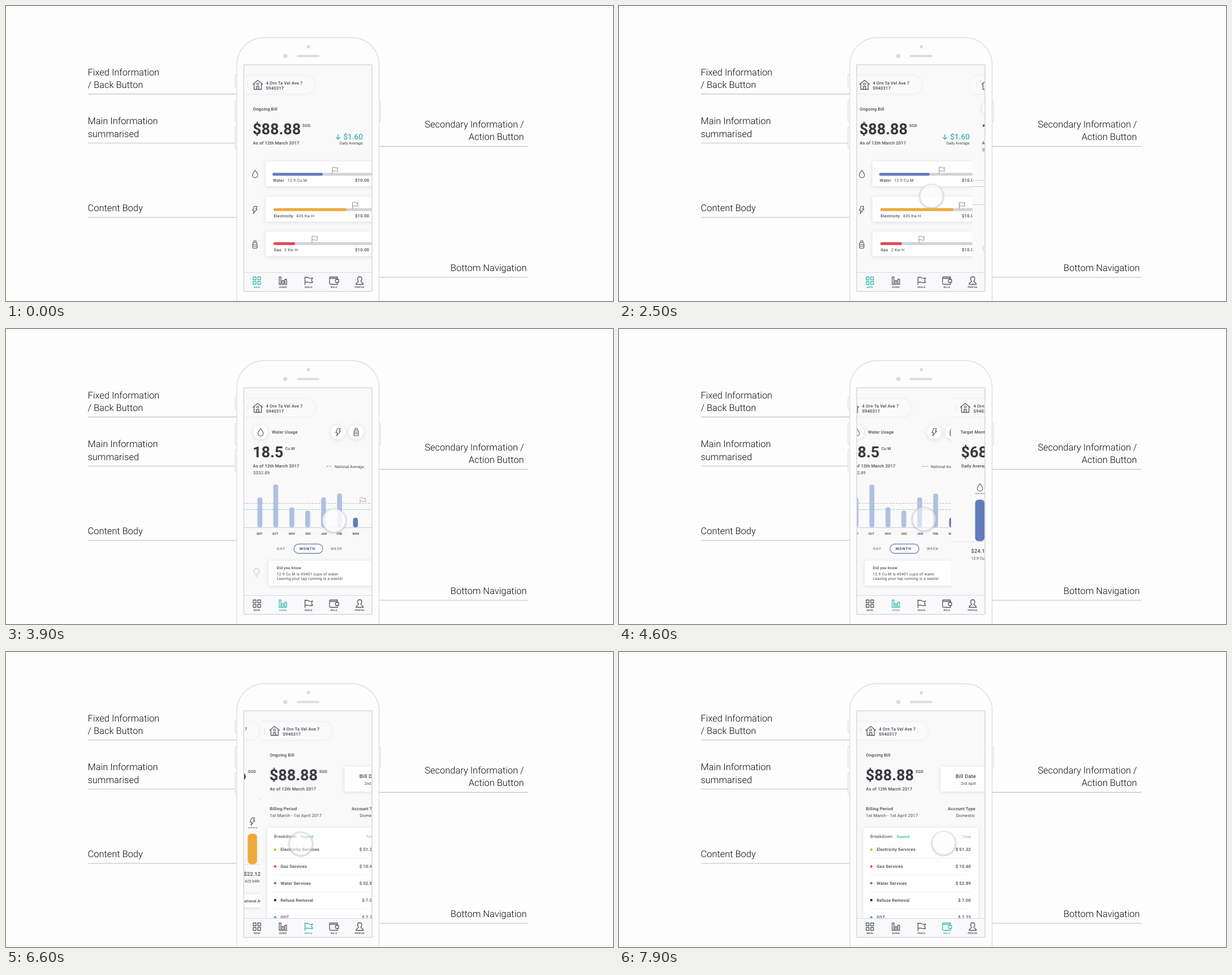
These frames come from a looping animation (1073 by 522 pixels, 8 s). An HTML page:

```html
<!DOCTYPE html>
<html lang="en">
<head>
<meta charset="utf-8">
<title>Utility app layout</title>
<style>
html, body { margin: 0; width: 100%; height: 100%; overflow: hidden; background: #fdfdfd; }
svg { display: block; width: 1073px; height: 522px; }
text { font-family: Roboto, sans-serif; fill: #45454c; text-rendering: geometricPrecision; }
.note text { font-size: 16.45px; font-weight: 300; fill: #0c0c0c; }
.rules path { fill: none; stroke-width: 1.2; }
.body { fill: none; stroke: #dedede; stroke-width: 1.4; }

.s { font-size: 6.8px; }
.l { font-size: 7.1px; letter-spacing: .25px; }
.tip-text { font-size: 6.8px; letter-spacing: .25px; }
.m { font-size: 7.6px; font-weight: 500; letter-spacing: .2px; }
.r { font-size: 7.6px; letter-spacing: .2px; }
.big { font-size: 27px; font-weight: 700; fill: #37373d; }
.unit { font-size: 7px; font-weight: 500; letter-spacing: .2px; }
.sum { font-size: 13.6px; font-weight: 500; fill: #3bb6aa; }
.price { font-size: 9.2px; font-weight: 500; letter-spacing: .2px; }
.month { font-size: 5.2px; font-weight: 700; letter-spacing: .2px; }
.range { font-size: 6.4px; font-weight: 700; letter-spacing: 1px; fill: #8b8b92; }
.b { font-weight: 500; }
.end { text-anchor: end; }
.mid { text-anchor: middle; }
.teal { fill: #3bb6aa; }

.icon { fill: none; stroke: #55555e; stroke-width: 1.1; stroke-linejoin: round; stroke-linecap: round; }
.card { fill: #fefefe; filter: drop-shadow(0 1px 3px rgba(70, 70, 95, .16)); }
.paper { fill: #f9f9fa; }
.track { fill: #d3d3d7; }
.blue { fill: #627cbc; }
.pale { fill: #b1bfe4; }
.gold { fill: #efaa3b; }
.red { fill: #e04a5c; }
.line { fill: none; stroke: #e0e0e8; }
.dash { fill: none; stroke: #55555e; stroke-width: 1.2; stroke-dasharray: 3.2 1.2; }

.page, .tab, .touch, .tip { animation: 8s infinite; }
.page { animation-timing-function: cubic-bezier(.4, 0, .2, 1); clip-path: url(#screen); }
.main { animation-name: main; }
.usage { animation-name: usage; }
.goals { animation-name: goals; }
.bills { animation-name: bills; }
@keyframes main {
  0%, 29.5% { transform: none; }
  39.5%, 100% { transform: translateX(-113px); }
}
@keyframes usage {
  0%, 29.5% { transform: translateX(227px); }
  39.5%, 54.9% { transform: translateX(0); }
  64.9%, 100% { transform: translateX(-113px); }
}
@keyframes goals {
  0%, 54.9% { transform: translateX(227px); }
  64.9%, 76.6% { transform: translateX(0); }
  86.6%, 100% { transform: translateX(-113px); }
}
@keyframes bills {
  0%, 76.6% { transform: translateX(227px); }
  86.6%, 100% { transform: translateX(0); }
}

.tab { color: #55555e; animation-timing-function: linear; }
.tab .icon { stroke: currentColor; stroke-width: 1.3; }
.tab text { fill: currentColor; font-size: 4.3px; font-weight: 700; text-anchor: middle; }
.t1 { animation-name: tab1; }
.t2 { animation-name: tab2; }
.t3 { animation-name: tab3; }
.t4 { animation-name: tab4; }
@keyframes tab1 {
  0%, 34.5% { color: #36bcae; }
  43.25%, 100% { color: #55555e; }
}
@keyframes tab2 {
  0%, 34.5%, 68.5%, 100% { color: #55555e; }
  43.25%, 59.9% { color: #36bcae; }
}
@keyframes tab3 {
  0%, 59.9%, 90.25%, 100% { color: #55555e; }
  68.5%, 81.5% { color: #36bcae; }
}
@keyframes tab4 {
  0%, 81.5% { color: #55555e; }
  90.25%, 100% { color: #36bcae; }
}

.touch { animation-name: touch; animation-timing-function: linear; }
@keyframes touch {
  0%, 18.75% { transform: translate(676px, 322px); }
  20% { transform: translate(664px, 323px); }
  25% { transform: translate(592px, 332px); }
  29.5% { transform: translate(570px, 336px); }
  32.6% { transform: translate(539px, 336px); }
  35.2% { transform: translate(518px, 337px); }
  38.75% { transform: translate(566px, 336px); }
  42.5% { transform: translate(588px, 340px); }
  51.25% { transform: translate(577px, 338px); }
  54.375% { transform: translate(568px, 337px); }
  57.5% { transform: translate(539px, 336px); }
  60% { transform: translate(518px, 337px); }
  63.75% { transform: translate(566px, 336px); }
  67% { transform: translate(588px, 340px); }
  70% { transform: translate(586px, 340px); }
  76.5% { transform: translate(570px, 338px); }
  79.6% { transform: translate(539px, 338px); }
  82.5% { transform: translate(521px, 339px); }
  86.25% { transform: translate(566px, 338px); }
  90% { transform: translate(588px, 340px); }
  98.75% { transform: translate(574px, 338px); }
  100% { transform: translate(571px, 338px); }
}
.tip { fill: #fdfdfe; stroke: #d8d8de; stroke-width: .6; animation-name: tip; animation-timing-function: linear; }
@keyframes tip {
  0%, 29.5%, 51.25%, 54.375%, 75%, 76.5%, 98%, 100% { fill-opacity: .95; }
  32.6%, 42.5%, 57.5%, 70%, 79.6%, 90% { fill-opacity: .5; }
}
</style>
</head>
<body>
<svg viewBox="0 0 1073 522">
<defs>
  <clipPath id="screen"><rect x="420.5" y="104.5" width="226" height="400"/></clipPath>
  <filter id="soft" x="-50%" y="-50%" width="200%" height="200%"><feGaussianBlur stdDeviation="1.2"/></filter>
  <path id="drop" d="M0-6.5C2-3.3 4.7-.3 4.7 2.3A4.7 4.5 0 0 1-4.7 2.3C-4.7-.3-2-3.3 0-6.5Z"/>
  <path id="bolt" d="M-1-6.5H4L2-1.8H4.5L-2.5 6.5-1 1H-4Z"/>
  <path id="tank" d="M-2-6.5H2V-3.5H-2ZM-2-3.5Q-4-3-4-1V4.5Q-4 6.5-2 6.5H2Q4 6.5 4 4.5V-1Q4-3 2-3.5M-4 0H4M-4 3H4"/>
  <path id="flag" d="M0 11V0Q2.5-1 5 .5T10 .5L8.5 3.5 10 6.5Q7.5 7.5 5 6.5T0 6.5"/>
  <g id="chip">
    <path class="card" style="filter:drop-shadow(0 0 2px rgba(70,70,95,.1));fill:#fafafb" d="M416 124H530.5A15.5 15.5 0 0 1 530.5 155H416Z"/>
    <path d="M427.5 135.5V144" stroke="#b8b8bf" stroke-width="1" stroke-dasharray="1.2 2"/>
    <path class="icon" style="stroke-width:1.3" d="M436.5 138.5 445 131.5 453.5 138.5M438.5 137.5V147.5H451.5V137.5M443 147.5V142.5H447V147.5"/>
    <circle class="icon" cx="445" cy="138" r="1.8"/>
    <text class="m" x="459.5" y="138.5">4 Orn Ta Vel Ave 7</text>
    <text class="m" x="459.5" y="147.5">S940317</text>
  </g>
  <g id="bill">
    <text class="m" x="436.5" y="185">Ongoing Bill</text>
    <text class="big" x="436" y="227">$88.88</text>
    <text class="unit" x="524" y="214">SGD</text>
    <text class="m" x="436.5" y="245">As of 12th March 2017</text>
  </g>
  <rect id="sheet" class="paper" x="420" y="104" width="227" height="368"/>
</defs>

<rect width="1073" height="522" fill="#fdfdfd"/>

<g class="note">
  <text x="144.5" y="122.5">Fixed Information</text>
  <text x="144.5" y="144.5">/ Back Button</text>
  <text x="144.5" y="208.5">Main Information</text>
  <text x="144.5" y="231.5">summarised</text>
  <text x="144.5" y="362.5">Content Body</text>
  <text class="end" x="915.5" y="214.5">Secondary Information /</text>
  <text class="end" x="915.5" y="236.5">Action Button</text>
  <text class="end" x="920.5" y="468.5">Bottom Navigation</text>
</g>
<g class="rules">
  <path stroke="#c3bdd8" d="M145 155.7H408"/>
  <path stroke="#c2bfc6" d="M145 242.5H405"/>
  <path stroke="#bcbbae" d="M145 374H408"/>
  <path stroke="#bfc3bb" d="M660 248.3H923"/>
  <path stroke="#bcc4a4" d="M660 480H923"/>
</g>

<g class="body">
  <path d="M408 523V104A48 48 0 0 1 456 56H611.5A48 48 0 0 1 659.5 104V523"/>
  <path d="M408 121H406Q405 121 405 123V141Q405 143 406 143H408M408 167H406Q405 167 405 169V203Q405 205 406 205H408M408 214H406Q405 214 405 216V250Q405 252 406 252H408M659.5 167H661Q662 167 662 169V203Q662 205 661 205H659.5"/>
</g>
<g fill="#dcdcdc">
  <circle cx="534.5" cy="72" r="3"/>
  <circle cx="493.7" cy="88.5" r="3.8"/>
  <rect x="514" y="86.5" width="40" height="4" rx="2"/>
</g>

<g clip-path="url(#screen)">
  <g class="page main">
    <use href="#sheet"/>
    <use href="#chip"/>
    <use href="#bill"/>
    <path d="M587 227V235.5M583.2 232 587 235.7 590.8 232" fill="none" stroke="#3bb6aa" stroke-width="1.4"/>
    <text class="sum end" x="631" y="236">$1.60</text>
    <text class="s end" x="630.5" y="245">Daily Average</text>

    <rect class="card" x="459" y="275" width="200" height="44" rx="2"/>
    <rect class="track" x="471" y="295.3" width="190" height="5" rx="2.5"/>
    <rect class="blue" x="471" y="295.3" width="89" height="5" rx="2.5"/>
    <text class="l b" x="472" y="310.5">Water</text>
    <text class="l" x="497.5" y="310.5">12.9 Cu M</text>
    <text class="m end" x="642" y="310.5">$10.00</text>

    <rect class="card" x="459" y="337.5" width="200" height="44" rx="2"/>
    <rect class="track" x="473" y="357.8" width="190" height="5" rx="2.5"/>
    <rect class="gold" x="473" y="357.8" width="129" height="5" rx="2.5"/>
    <text class="l b" x="473.5" y="373.5">Electricity</text>
    <text class="l" x="513" y="373.5">435 Kw H</text>
    <text class="m end" x="642" y="373.5">$10.00</text>

    <rect class="card" x="459" y="399" width="200" height="44" rx="2"/>
    <rect class="track" x="473" y="418" width="190" height="5" rx="2.5"/>
    <rect class="red" x="473" y="418" width="38" height="5" rx="2.5"/>
    <text class="l b" x="473.5" y="434">Gas</text>
    <text class="l" x="492" y="434">2 Kw H</text>
    <text class="m end" x="642" y="434">$10.00</text>

    <g class="icon">
      <use href="#drop" x="440.3" y="297"/>
      <use href="#bolt" x="439.7" y="361"/>
      <use href="#tank" x="440" y="422"/>
      <g stroke="#85858c" stroke-width=".9">
        <use href="#flag" x="577" y="285.5"/>
        <use href="#flag" x="612.5" y="347.5"/>
        <use href="#flag" x="541" y="407.5"/>
      </g>
    </g>
  </g>

  <g class="page usage">
    <use href="#sheet"/>
    <use href="#chip"/>
    <circle class="card" cx="450" cy="182.5" r="13"/>
    <circle class="card" cx="587" cy="182.5" r="13"/>
    <circle class="card" cx="619" cy="182.5" r="13"/>
    <g class="icon">
      <use href="#drop" x="450" y="182.5"/>
      <use href="#bolt" x="587" y="182.5"/>
      <use href="#tank" x="619" y="182.5"/>
    </g>
    <text class="m" x="470" y="185">Water Usage</text>
    <text class="big" x="436" y="227">18.5</text>
    <text class="unit" x="493.5" y="214">Cu M</text>
    <text class="m" x="436.5" y="245">As of 12th March 2017</text>
    <path class="dash" d="M566 243H576" style="stroke:#3bb6aa;stroke-dasharray:4 1.5"/>
    <text class="s end" x="632.5" y="245.5">National Average</text>
    <text class="r" x="437" y="257">S$52.89</text>

    <path d="M420 351.5H647" stroke="#c5cbe6"/>
    <g class="pale">
      <rect x="444.5" y="298" width="8.6" height="53" rx="4"/>
      <rect x="472.5" y="275" width="8.6" height="76" rx="4"/>
      <rect x="501" y="315.5" width="8.6" height="35.5" rx="4"/>
      <rect x="529" y="321.5" width="8.6" height="29.5" rx="4"/>
      <rect x="557" y="298" width="8.6" height="53" rx="4"/>
      <rect x="585.3" y="291" width="8.6" height="60" rx="4"/>
      <rect class="blue" x="613.5" y="334" width="8.6" height="17" rx="4"/>
    </g>
    <path d="M420 308.5H647" stroke="#b9c3b8" stroke-dasharray="3.5 2"/>
    <path d="M420 319.5H647" stroke="#84cfcb" stroke-dasharray="3.5 2"/>
    <g class="icon" style="stroke:#b9b9bf"><use href="#flag" x="626" y="298.5"/></g>
    <g class="mid">
      <text class="month" x="448" y="364">SEP</text>
      <text class="month" x="476" y="364">OCT</text>
      <text class="month" x="505.5" y="364">NOV</text>
      <text class="month" x="534.3" y="364">DEC</text>
      <text class="month" x="562" y="364">JAN</text>
      <text class="month" x="589.3" y="364">FEB</text>
      <text class="month" x="618.5" y="364">MAR</text>
    </g>
    <rect x="509" y="380.5" width="51" height="16.5" rx="8.2" fill="#fdfdfe" stroke="#7388c4" stroke-width="1.4"/>
    <text class="range" x="479" y="391">DAY</text>
    <text class="range" x="519" y="391" style="fill:#45454c">MONTH</text>
    <text class="range" x="574" y="391">WEEK</text>

    <rect class="card" x="464" y="410" width="195" height="44" rx="2"/>
    <path class="icon" style="stroke:#c6c6cc" d="M441 434Q438.3 431 438.3 428.7A4.8 4.8 0 0 1 447.9 428.7Q447.9 431 445.2 434ZM441 436.5H445.2M442 439H444.2"/>
    <text class="tip-text b" x="478.5" y="425">Did you know</text>
    <text class="tip-text" x="478.5" y="435.5">12.9 Cu M is 45401 cups of water</text>
    <text class="tip-text" x="478.5" y="443.5">Leaving your tap running is a waste!</text>
  </g>

  <g class="page goals">
    <use href="#sheet"/>
    <use href="#chip"/>
    <text class="m" x="436.5" y="185">Target Monthly Bill</text>
    <text class="big" x="437.5" y="227">$68.66</text>
    <text class="unit" x="526" y="214">SGD</text>
    <text class="m" x="438" y="245">Daily Average S$2.21</text>
    <text class="sum end" x="632.5" y="235.5">$20.00</text>
    <text class="s end" x="632.5" y="245.5">Potential Savings</text>
    <path class="dash" d="M547.5 261H557"/>
    <text class="s end" x="632.5" y="263">Current Average Usage</text>

    <path class="line" d="M420 376.5H647"/>
    <rect class="blue" x="462.5" y="302" width="16.5" height="73.5" rx="6"/>
    <rect class="gold" x="525.5" y="321.5" width="16.5" height="54" rx="6"/>
    <rect class="red" x="587.5" y="366.5" width="16.5" height="9" rx="4.5"/>
    <path class="dash" d="M463 291H479.5M526 311H542.5M588 360.5H604.5"/>
    <g class="icon">
      <use href="#drop" x="471" y="280"/>
      <use href="#bolt" x="533.7" y="300"/>
      <use href="#tank" x="595.5" y="350"/>
    </g>
    <g class="mid">
      <text class="price" x="470.5" y="395.5">$24.10</text>
      <text class="price" x="533.5" y="395.5">$22.12</text>
      <text class="price" x="595.3" y="395.5">$10.11</text>
      <text class="s" x="471" y="407.5">12.9 Cu M</text>
      <text class="s" x="533.5" y="407.5">423 kWh</text>
      <text class="s" x="595.5" y="407.5">23 kWh</text>
    </g>
    <rect class="card" x="483" y="429" width="104" height="23" rx="2.5"/>
    <text class="s b mid" x="535" y="442.5" letter-spacing=".1">Set National Average</text>
  </g>

  <g class="page bills">
    <use href="#sheet"/>
    <use href="#chip"/>
    <use href="#bill"/>
    <rect class="card" x="568.5" y="203" width="90" height="44" rx="2"/>
    <text class="price end" x="631" y="223">Bill Date</text>
    <text class="s end" x="631" y="234.5">2nd April</text>
    <text class="m" x="436.5" y="280">Billing Period</text>
    <text class="r" x="436.5" y="291.5">1st March - 1st April 2017</text>
    <text class="m end" x="630" y="280">Account Type</text>
    <text class="r end" x="629.5" y="291.5">Domestic</text>

    <rect class="card" x="432" y="311" width="203" height="180" rx="2"/>
    <text class="r" x="444" y="328.5">Breakdown</text>
    <text class="s b teal" x="491" y="328.5">Expand</text>
    <text class="s end" x="622" y="328.5" style="fill:#a4a4aa">Total</text>
    <path class="line" d="M443 364.5H622M443 394H622M443 424H622M443 454H622" style="stroke:#f0f0f3"/>
    <circle class="gold" cx="446" cy="349.8" r="2.2"/>
    <circle class="red" cx="446" cy="379.5" r="2.2"/>
    <circle class="blue" cx="446" cy="409" r="2.2"/>
    <circle cx="446" cy="439" r="2.2" fill="#2d2d35"/>
    <circle class="teal" cx="446" cy="469.5" r="2.2"/>
    <text class="m" x="455.5" y="352.3">Electricity Services</text>
    <text class="m" x="455.5" y="382">Gas Services</text>
    <text class="m" x="455.5" y="411.5">Water Services</text>
    <text class="m" x="455.5" y="441.5">Refuse Removal</text>
    <text class="m" x="455.5" y="472">GST</text>
    <text class="m end" x="622" y="352.3">$ 51.32</text>
    <text class="m end" x="622" y="382">$ 10.40</text>
    <text class="m end" x="622" y="411.5">$ 52.89</text>
    <text class="m end" x="622" y="441.5">$ 7.00</text>
    <text class="m end" x="622" y="472">$ 7.73</text>
  </g>

  <rect x="420" y="471.5" width="227" height="34" fill="#f9f9fb"/>
  <path d="M420 471.5H647" stroke="#d9d9e0" stroke-width="1.2"/>
  <g class="tab t1">
    <path class="icon" d="M437 479.5H442V484.5H437ZM445 479.5H450V484.5H445ZM437 487.5H442V492.5H437ZM445 487.5H450V492.5H445Z"/>
    <text x="443.3" y="499">MAIN</text>
  </g>
  <g class="tab t2">
    <path class="icon" d="M483 479.5H486V492.5H483ZM488 486H491V492.5H488ZM493 483.5H496V492.5H493Z"/>
    <text x="489.3" y="499">USAGE</text>
  </g>
  <g class="tab t3">
    <path class="icon" d="M528.5 493V479.5M528.5 481Q532 479 535 481T542 481L540 485 542 489Q538 490 535 489T528.5 489"/>
    <text x="534.5" y="499">GOALS</text>
  </g>
  <g class="tab t4">
    <path class="icon" d="M586 483V479.5H573Q572 479.5 572 481V491Q572 492.5 573.5 492.5H586V489M572 482H586V484M583 484H588V489H583Q581 486.5 583 484Z"/>
    <text x="579.5" y="499">BILLS</text>
  </g>
  <g class="tab">
    <path class="icon" d="M625.2 479C621 479 620.5 484 623.3 487.3 622.5 489.5 618.8 489 618.8 492.5H631.6C631.6 489 628 489.5 627.2 487.3 630 484 629.5 479 625.2 479Z"/>
    <text x="625" y="499">PROFILE</text>
  </g>

  <g class="touch">
    <circle cy="1" r="20.8" fill="none" stroke="#b2b2bc" stroke-width="1.6" filter="url(#soft)"/>
    <circle class="tip" r="20.5"/>
  </g>
</g>
<rect x="420.3" y="104" width="226.6" height="401" rx="1" fill="none" stroke="#d6d6de" stroke-width="1.5"/>
</svg>
</body>
</html>
```
